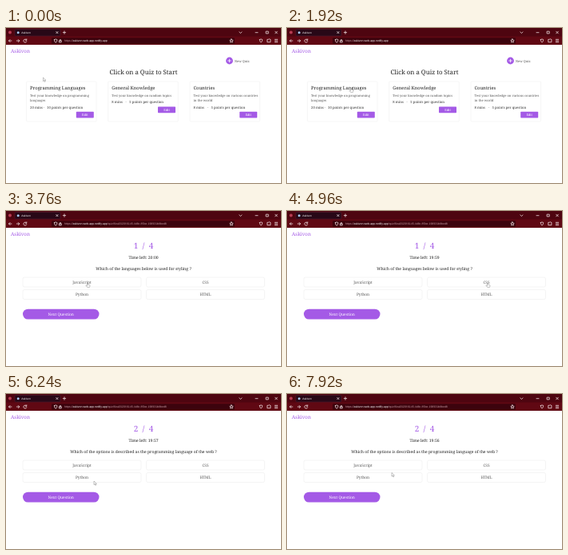
An HTML page that plays this animation: 344x194 px, repeating every 8 s.

```html
<!DOCTYPE html>
<html lang="en">
<head>
<meta charset="utf-8">
<title>Quiz walkthrough</title>
<style>
  html, body { margin: 0; width: 100%; height: 100%; overflow: hidden; background: #fff; }
  svg { display: block; width: 100vw; height: 100vh; }
  text { font-family: "Noto Serif", serif; text-rendering: geometricPrecision; white-space: pre; }
  .ui { font-family: "Liberation Sans", Arial, sans-serif; }
  .line { fill: none; stroke: #f6e8ea; stroke-width: .75; stroke-linecap: round; stroke-linejoin: round; }
</style>
</head>
<body>
<svg id="stage" viewBox="0 0 344 194" preserveAspectRatio="none"></svg>
<script>
const LOOP = 8000;
const PURPLE = '#a45ae6';
const BRAND = 'Askivon';
const DETAILS_AT = 2000, QUIZ_AT = 2900, NEXT_AT = 5720, TICK = 1100;

const text = (x, y, size, str, { fill = '#222', anchor = 'start', weight = 400, cls = '', id = '' } = {}) =>
  `<text x="${x}" y="${y}" font-size="${size}" fill="${fill}" text-anchor="${anchor}" font-weight="${weight}" class="${cls}" id="${id}">${str}</text>`;
const centered = (x, y, size, str, options = {}) => text(x, y, size, str, { anchor: 'middle', ...options });
const box = (x, y, w, h, fill, r = 0, stroke = 'none') =>
  `<rect x="${x}" y="${y}" width="${w}" height="${h}" rx="${r}" fill="${fill}" stroke="${stroke}" stroke-width=".5"/>`;
const line = d => `<path class="line" d="${d}"/>`;
const button = (x, y, w, h, r, size, label) =>
  box(x, y, w, h, PURPLE, r) + centered(x + w / 2, y + h / 2 + size * .35, size, label, { fill: '#fff', weight: 500 });

function browser() {
  const ui = (x, y, size, str, fill) => text(x, y, size, str, { fill, cls: 'ui' });
  return box(0, 0, 344, 11, '#4e0510') + box(0, 10.5, 344, 10.5, '#600813')
    + '<circle cx="5" cy="5.5" r="2" fill="#b73c52"/>'
    + box(11, 1.5, 57, 8.5, '#280817', 1.3, '#592036')
    + '<circle cx="15.2" cy="5.7" r="1.5" fill="#a9c8ee"/>'
    + ui(19.2, 6.9, 3.3, BRAND, '#fff')
    + line('M62.8 4.5l2.2 2.2m0-2.2l-2.2 2.2 M71.3 5.6h3.4m-1.7-1.7v3.4')
    + line('M291.8 5l1.6 1.5 1.6-1.5 M312 5.7h3 M325.5 4.2h2.7v2.7h-2.7z M336.7 4.2l2.7 2.7m0-2.7l-2.7 2.7')
    + line('M7 16H3.5m1.5-1.5L3.5 16 5 17.5 M13.3 16h3.5m-1.5-1.5l1.5 1.5-1.5 1.5')
    + line('M25.6 15a2 2 0 1 0 .2 1.8 M25.8 13.8v1.4h-1.4')
    + box(57, 12.3, 229, 7.4, '#3c030d', 1.2)
    + line('M60.5 14.6l1.7-.7 1.7.7c0 2-.4 3-1.7 3.6-1.3-.6-1.7-1.6-1.7-3.6z M66.8 15.8h2.4v2.1h-2.4z M67.3 15.8v-.8q.7-1.5 1.4 0v.8')
    + line('M282 13.8l.7 1.4 1.5.2-1.1 1 .3 1.5-1.4-.7-1.4.7.3-1.5-1.1-1 1.5-.2z')
    + line('M317.4 14.4q1.6-1 3.2 0c0 2-.5 3-1.6 3.6-1.1-.6-1.6-1.6-1.6-3.6z M327.2 14.3h1.3q.8-1.6 1.4 0h1v3.4h-3.7z M336.3 14.3h3.4m-3.4 1.7h3.4m-3.4 1.7h3.4')
    + ui(73, 17.3, 3.5, 'https://<tspan fill="#fff">' + BRAND.toLowerCase() + '-web-app.netlify.app</tspan><tspan id="path"></tspan>', '#c79da5')
    + text(6, 31, 6.2, BRAND, { fill: PURPLE, weight: 500 });
}

function card(x, title, lines, mins, points) {
  const drop = lines.length > 1 ? 6.3 : 0;
  const meta = (dx, str) => text(x + dx, 94.3 + drop, 4.25, str, { fill: '#333' });
  const pointsX = mins > 9 ? 25.5 : 26.5;
  return box(x, 67, 87.5, 50, '#fff', 1, '#ececec')
    + text(x + 4.5, 77.2, 5.8, title)
    + lines.map((str, i) => text(x + 4.5, 86.3 + 6 * i, 4.05, str, { fill: '#555' })).join('')
    + meta(4.5, mins + ' mins') + meta(21.7, '·') + meta(pointsX, points + ' points per question')
    + button(x + 62.2, 98.4, 22, 7.8, .7, 4, 'Edit').replaceAll(/ y="([\d.]+)"/g, (_, y) => ` y="${+y + drop}"`);
}

function home() {
  return '<circle cx="279.5" cy="41" r="4.4" fill="' + PURPLE + '"/>'
    + '<path d="M277.3 41h4.4m-2.2-2.2v4.4" stroke="#fff" stroke-width=".8"/>'
    + text(286, 42.5, 4, 'New Quiz', { fill: '#555' })
    + centered(172, 58.4, 7.85, 'Click on a Quiz to Start')
    + card(25.6, 'Programming Languages', ['Test your knowledge on programming', 'languages'], 20, 10)
    + card(127.8, 'General Knowledge', ['Test your knowledge on random topics'], 8, 5)
    + card(230, 'Countries', ['Test your knowledge on various countries', 'in the world'], 8, 5);
}

function details() {
  const row = (y, size, str) => centered(172, y, size, str, { fill: '#555' });
  return centered(172, 69, 8.8, 'Programming Languages', { weight: 600 })
    + row(82, 6.3, 'Test your knowledge on programming languages')
    + row(95, 5.9, '20 mins') + row(108.5, 5.9, '10 points per question')
    + button(128, 120.8, 88, 12.6, 1.2, 6, 'Start Quiz');
}

function quiz() {
  const option = (x, y, label) =>
    box(x, y, 148, 12, '#fff', 2, '#e9e9e9') + centered(x + 74, y + 7.9, 4.8, label, { fill: '#555' });
  return centered(172, 47.2, 10, '', { fill: PURPLE, id: 'count', weight: 500 })
    + centered(172, 60.4, 5.1, '', { id: 'timer' })
    + centered(172, 73.6, 5.05, '', { id: 'question' })
    + option(21, 83, 'JavaScript') + option(175.5, 83, 'CSS')
    + option(21, 98.5, 'Python') + option(175.5, 98.5, 'HTML')
    + button(21, 122.7, 95.5, 12.8, 6.4, 4.8, 'Next Question');
}

const byId = id => document.getElementById(id);
byId('stage').innerHTML = box(0, 0, 344, 194, '#fff') + browser()
  + `<g id="home">${home()}</g><g id="details">${details()}</g><g id="quiz">${quiz()}</g>`
  + `<g id="cursor" stroke="#555" stroke-width=".35" stroke-linejoin="round" fill="#fff">
      <path id="arrow" d="M0 0v4.6l1.1-1 .8 1.8.8-.4-.8-1.7h1.5z"/>
      <path id="hand" d="M-.5 .3q.5-.6 1 0v1.8l2.2.6q.5.3.3 1l-.5 1.7H-.4L-2 3.4q.1-.8.8-.3l.7.5z"/></g>`;

// Pointer stops: time, x, y
const stops = [
  [0, 46.5, 62], [500, 46.5, 62], [1500, 80, 75], [2080, 80, 75], [2640, 164, 132], [2960, 164, 132],
  [3600, 102, 90], [3900, 102, 90], [4700, 251, 90], [5080, 251, 90], [5560, 72, 130],
  [5800, 72, 130], [6200, 110, 109], [6400, 110, 109], [7400, 131, 98.5], [LOOP, 131, 98.5]
];

function pointerAt(t) {
  const i = stops.findIndex(stop => stop[0] > t);
  const [t0, x0, y0] = stops[i - 1], [t1, x1, y1] = stops[i];
  const p = (t - t0) / (t1 - t0), ease = p * p * (3 - 2 * p);
  return [x0 + (x1 - x0) * ease, y0 + (y1 - y0) * ease];
}

function isClickable(page, x, y) {
  const inside = (l, t, r, b) => x > l && x < r && y > t && y < b;
  if (page === 'home') return inside(60, 67, 113, 117);
  if (page === 'details') return inside(128, 121, 216, 133.5);
  return inside(21, 122.7, 116.5, 135.5) || inside(21, 83, 169, 95) || inside(175.5, 83, 323.5, 95);
}

function draw(t) {
  const page = t < DETAILS_AT ? 'home' : t < QUIZ_AT ? 'details' : 'quiz';
  for (const id of ['home', 'details', 'quiz']) byId(id).style.display = id === page ? '' : 'none';
  byId('path').textContent = page === 'home' ? '' : '/quiz/6ea0320f-6145-4d8c-85be-196931b8bed8';

  const elapsed = Math.max(0, Math.floor((t - QUIZ_AT) / TICK));
  byId('timer').textContent = 'Time left: ' + (elapsed ? '19:' + (60 - elapsed) : '20:00');
  byId('count').textContent = (t < NEXT_AT ? '1' : '2') + '  /  4';
  byId('question').textContent = t < NEXT_AT
    ? 'Which of the languages below is used for styling ?'
    : 'Which of the options is described as the programming language of the web ?';

  const [x, y] = pointerAt(t);
  const hand = isClickable(page, x, y);
  byId('cursor').setAttribute('transform', `translate(${x} ${y})`);
  byId('hand').style.display = hand ? '' : 'none';
  byId('arrow').style.display = hand ? 'none' : '';
}

const start = performance.now();
function frame() {
  draw((performance.now() - start) % LOOP);
  requestAnimationFrame(frame);
}
frame();
</script>
</body>
</html>
```
